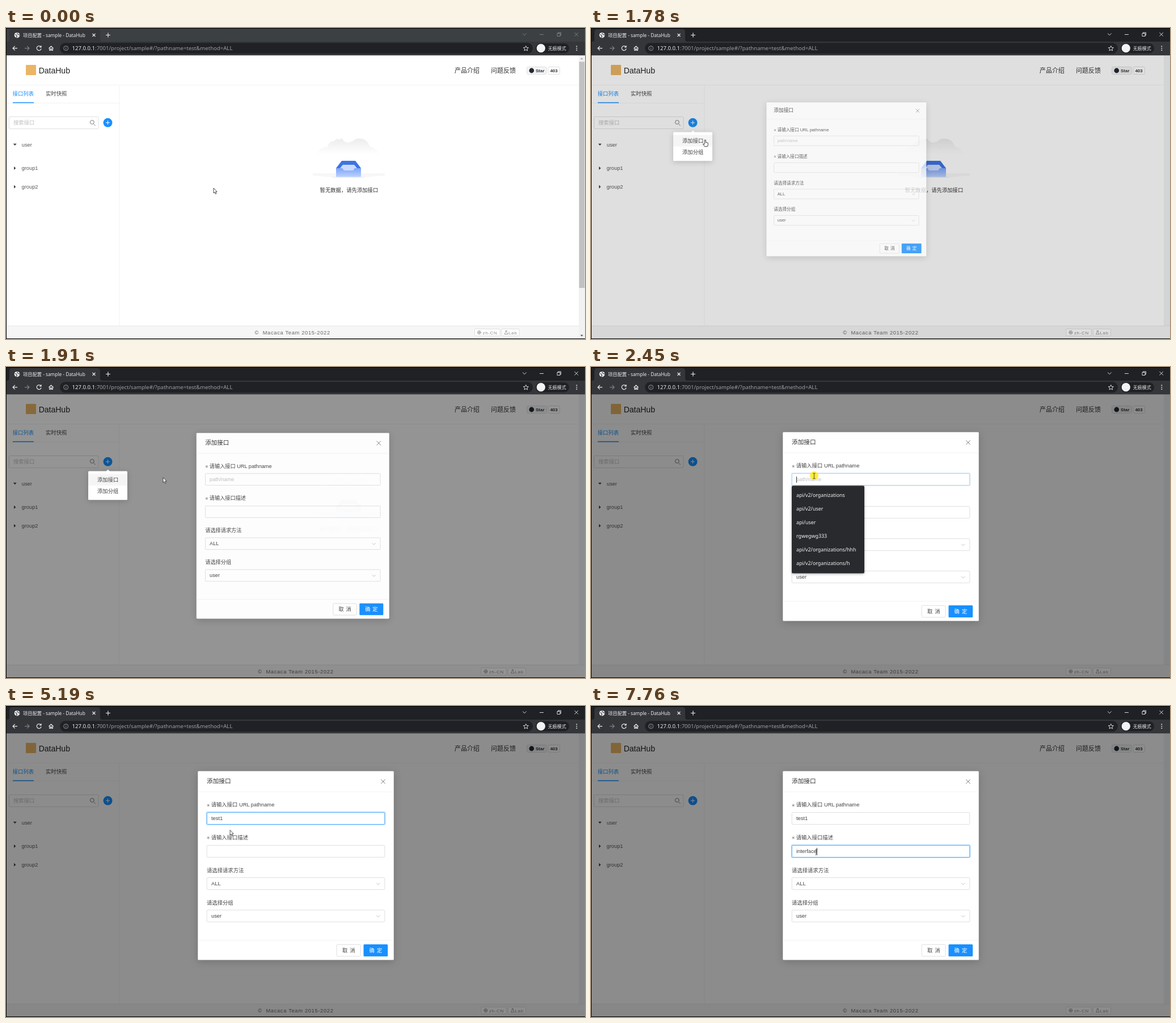
Write an HTML page that moves like this. It is 1021x548 px and loops after 8000 ms.

```html
<!DOCTYPE html>
<html lang="zh-CN">
<head>
<meta charset="utf-8">
<title>DataHub</title>
<style>
html, body { margin: 0; width: 100%; height: 100%; overflow: hidden; background: #fff; }
svg { display: block; width: 1021px; height: 548px; }
text { font: 9.33px "Liberation Sans", "Noto Sans CJK SC", "Noto Sans CJK", sans-serif; fill: #444; white-space: pre; }
.ui text { font-family: "Noto Sans", "Noto Sans CJK SC", "Noto Sans CJK", sans-serif; fill: #e8eaed; }
.ui .tab { font-size: 8.28px; }
.ui .url { font-size: 9.58px; fill: #9aa0a6; }
.ui .mode { font-size: 8px; font-weight: 500; }
.nav text { font-size: 11px; fill: #333; }
.nav .brand { font-size: 14px; fill: #222; }
.nav .star { font-size: 8px; font-weight: bold; }
.tree text { fill: #5a5a5a; }
.hint, text.hint { fill: #bfbfbf; }
.blue, text.blue { fill: #1890ff; }
.foot text { letter-spacing: .667px; fill: #666; }
.foot .tag { font-size: 8px; fill: #8c8c8c; }
.box { fill: #fff; stroke: #d9d9d9; stroke-width: .8; }
.line { fill: none; stroke: #e8eaed; stroke-width: 1.2; }
.rule { stroke: #f0f0f0; stroke-width: .8; }
.ring { fill: none; stroke: #40a9ff; stroke-width: .9; }
.glow { fill: none; stroke: #1890ff; stroke-opacity: .22; stroke-width: 1.6; }
.popup rect { fill: #292a2d; filter: drop-shadow(0 1px 2px rgba(0,0,0,.35)); }
.popup text { font: 8.9px "Noto Sans", sans-serif; fill: #f1f3f4; }
.wide { letter-spacing: 4px; }

.frame { fill: #202124; }
.idle .frame { fill: #3c4043; }
.idle #controls { opacity: .4; }
.locked #scroll { display: none; }
.locked #credit { transform: translateX(5.7px); }
.locked #tags { transform: translateX(11.4px); }

#mask { animation: mask 8s linear infinite; }
#modal { transform-origin: 182px 202px; animation: zoom 8s linear infinite; }
#menu { transform-origin: 180px 181px; animation: menu 8s linear infinite; }
#cursor { animation: path 8s linear infinite; }

@keyframes mask { 0%, 21.56% { opacity: 0; } 24.06%, 100% { opacity: .45; } }
@keyframes zoom {
  0% { opacity: 0; transform: scale(.2); }
  21.56% { opacity: 0; transform: scale(.2); animation-timing-function: cubic-bezier(.08,.82,.17,1); }
  25.31%, 100% { opacity: 1; transform: none; }
}
@keyframes menu {
  0% { opacity: 0; transform: scaleY(.8); }
  7.5% { opacity: 0; transform: scaleY(.8); animation-timing-function: cubic-bezier(.23,1,.32,1); }
  10%, 24.2% { opacity: 1; transform: none; animation-timing-function: cubic-bezier(.755,.05,.855,.06); }
  26.7%, 100% { opacity: 0; transform: scaleY(.8); }
}
@keyframes path {
  0%, .7% { transform: translate(366px,282px); animation-timing-function: cubic-bezier(.4,.1,.4,1); }
  9%, 10.8% { transform: translate(180px,168px); animation-timing-function: ease-in-out; }
  14.5% { transform: translate(179px,219px); animation-timing-function: ease-in-out; }
  18.9%, 21.4% { transform: translate(182px,198px); }
  23.1% { transform: translate(220px,196px); animation-timing-function: cubic-bezier(.2,.5,.4,1); }
  28.8%, 62% { transform: translate(393.5px,192px); animation-timing-function: ease-in-out; }
  68.5%, 100% { transform: translate(397.5px,257.5px); }
}
</style>
</head>
<body>
<svg id="stage" class="idle" viewBox="0 0 1021 548">
  <defs>
    <linearGradient id="cloud" x2="0" y2="1"><stop stop-color="#ececec"/><stop offset="1" stop-color="#fff"/></linearGradient>
    <linearGradient id="tray" x2="0" y2="1"><stop stop-color="#7da5f8"/><stop offset="1" stop-color="#bcd2ff"/></linearGradient>
    <path id="down" class="line" d="M-3-1.5 0 1.7 3-1.5" style="stroke:#bfbfbf;stroke-width:.9"/>
  </defs>
  <rect width="1021" height="548" fill="#fff"/>

  <!-- page -->
  <rect x="1010" y="48" width="11" height="477" fill="#f0f2f5"/>
  <path class="rule" d="M1 100.5H1010M200 101V525M1 132.3H200"/>
  <g class="nav">
    <rect x="35" y="65" width="18" height="18" rx="1" fill="#eab565"/>
    <text class="brand" x="57.7" y="80">DataHub</text>
    <text x="791" y="79">产品介绍</text>
    <text x="855" y="79">问题反馈</text>
    <rect class="box" x="918.6" y="68.5" width="34.5" height="13" rx="2" style="fill:#f3f5f7"/>
    <rect class="box" x="956" y="68.5" width="20.5" height="13" rx="2"/>
    <circle cx="926.8" cy="75" r="4.4" fill="#24292f"/>
    <text class="star" x="934" y="77.8">Star</text>
    <text class="star" x="959.4" y="77.8">403</text>
  </g>
  <text class="blue" x="11.7" y="119.4">接口列表</text>
  <text x="70" y="119.4">实时快照</text>
  <rect class="blue" x="12" y="130.8" width="37" height="1.5"/>
  <rect class="box" x="5.5" y="156.4" width="157.5" height="21.2" rx="1.5"/>
  <text class="hint" x="13" y="170">搜索接口</text>
  <path class="line" d="M155 169.5 157.6 172.2M155.3 166a3.4 3.4 0 1 1-6.8 0a3.4 3.4 0 0 1 6.8 0" style="stroke:#777;stroke-width:1"/>
  <circle class="blue" cx="179.5" cy="166.8" r="8"/>
  <path d="M176 166.8h7M179.5 163.3v7" stroke="#fff"/>
  <g class="tree">
    <path d="M12.7 203.8h6l-3 3.4zM14 244v6l3.4-3zM14 276.8v6l3.4-3z" fill="#444"/>
    <text x="27.7" y="208.6">user</text>
    <text x="27.5" y="250.2">group1</text>
    <text x="27.5" y="283.2">group2</text>
  </g>

  <path d="M547 222Q552 211 567 209Q570 199 579 199Q583 193 588 197Q592 192 595 198Q601 205 612 199Q617 194 626 195Q637 196 642 209Q652 212 660 222Z" fill="url(#cloud)"/>
  <path d="M541 256H668V260Q604 267 541 260Z" fill="#f7f7f7"/>
  <path d="M576 262h55v2h-55z" fill="#f1f1f1"/>
  <path d="M592 234h24l10 13v8h-44v-8z" fill="#3d74e2"/>
  <path d="M594 241h20l5 6v6h-30v-6z" fill="#cbdaff"/>
  <path d="M582 247h10q2 0 2.500 2t2.500 2h14q2 0 2.500-2t2.500-2h10v14q0 1.500-1.500 1.500h-41q-1.500 0-1.500-1.500z" fill="url(#tray)"/>
  <text x="553.6" y="289.4" style="fill:#333">暂无数据，请先添加接口</text>

  <g class="foot">
    <rect y="525" width="1021" height="23" fill="#f6f6f6"/>
    <path d="M0 525H1021" stroke="#e6e6e6"/>
    <g id="credit"><text x="438.500" y="540">©</text><text x="452.700" y="540">Macaca Team 2015-2022</text></g>
    <g id="tags">
      <rect class="box" x="826.5" y="530.3" width="44.5" height="12.2" rx="1.3"/>
      <rect class="box" x="874" y="530.3" width="31" height="12.2" rx="1.3"/>
      <path class="line" d="M831.500 536.500h6M834.500 533.500v6M837.500 536.500a3 3 0 1 1-6 0a3 3 0 0 1 6 0M880.500 533.500h3M881 533.500v2.500l-2 3.500h6l-2-3.500v-2.500" style="stroke:#888;stroke-width:.8"/>
      <text class="tag" x="840.500" y="539.500">zh-CN</text>
      <text class="tag" x="886" y="539.500">Lab</text>
    </g>
  </g>
  <g id="scroll">
    <rect x="1010" y="48" width="11" height="500" fill="#f1f1f1"/>
    <rect x="1010.700" y="59.500" width="9.600" height="398.500" fill="#c1c1c1"/>
    <path d="M1012.800 55.200h5l-2.500-2.700z" fill="#a3a3a3"/>
    <path d="M1012.800 540.700h5l-2.500 2.700z" fill="#505050"/>
  </g>
  <rect id="mask" y="48" width="1021" height="500"/>

  <!-- add menu -->
  <g id="menu">
    <g style="filter:drop-shadow(0 2px 5px rgba(0,0,0,.18))">
      <path d="M176.500 184 179.800 180.700 183 184z" fill="#fff"/>
      <rect x="145" y="183.500" width="69" height="50.700" rx="1.500" fill="#fff"/>
    </g>
    <rect id="hover" x="145" width="69" height="20.300" fill="#f5f5f5"/>
    <text x="161" y="202">添加接口</text>
    <text x="161" y="222">添加分组</text>
  </g>

  <!-- dialog -->
  <g id="modal">
    <rect x="338.300" y="114.800" width="345.500" height="332.700" rx="1.500" fill="#fff" style="filter:drop-shadow(0 3px 7px rgba(0,0,0,.18))"/>
    <path class="rule" d="M338.300 151.300H683.800M338.300 412.800H683.800"/>
    <text x="354" y="136" style="font-size:10.67px;fill:#333">添加接口</text>
    <path class="line" d="m661.300 129.300 7.400 7.600m0-7.600-7.400 7.600" style="stroke:#808080;stroke-width:1"/>
    <path d="M356.700 172.500v5M354.500 173.700l4.400 2.600M358.900 173.700l-4.400 2.600M356.700 229.700v5M354.500 230.900l4.400 2.600M358.900 230.900l-4.400 2.600" stroke="#8a8a8a" stroke-width=".8"/>
    <text x="361.700" y="177.400">请输入接口 URL pathname</text>
    <text x="361.700" y="234.700">请输入接口描述</text>
    <text x="354" y="292.500">请选择请求方法</text>
    <text x="354" y="349.500">请选择分组</text>
    <g id="inputs"></g>
    <text x="362" y="316">ALL</text>
    <text x="362" y="373">user</text>
    <use href="#down" x="656.300" y="313.300"/>
    <use href="#down" x="656.300" y="370.300"/>
    <text id="holder" class="hint" x="362" y="201.300">path/name</text>
    <g id="ring0"><rect class="glow" x="353.300" y="186.500" width="315.500" height="23" rx="2"/><rect class="ring" x="354.300" y="187.500" width="313.500" height="21" rx="1.500"/></g>
    <g id="ring1"><rect class="glow" x="353.300" y="244.500" width="315.500" height="23" rx="2"/><rect class="ring" x="354.300" y="245.500" width="313.500" height="21" rx="1.500"/></g>
    <text id="value0" x="362" y="201.300"></text>
    <text id="value1" x="362" y="258.800"></text>
    <rect id="caret0" y="193" width=".9" height="11" fill="#222"/>
    <rect id="caret1" y="250" width=".9" height="11" fill="#222"/>
    <rect class="box" x="583.200" y="420.300" width="42" height="20.700" rx="1.500"/>
    <rect class="blue" x="630.500" y="419.900" width="42.700" height="21.300" rx="1.500"/>
    <text class="wide" x="593" y="433.500">取消</text>
    <text class="wide" x="640.600" y="433.500" style="fill:#fff">确定</text>
  </g>
  <g id="popup0" class="popup"></g>
  <g id="popup1" class="popup"></g>

  <!-- browser bar -->
  <g class="ui">
    <rect class="frame" width="1021" height="25"/>
    <path d="M2 24q4 0 4-4V7q0-5 5-5h150q5 0 5 5v13q0 4 4 4h851v24.300H0V24z" fill="#35363a"/>
    <rect x="95" y="26.300" width="834" height="18.900" rx="9.400" fill="#202124"/>
    <rect x="934" y="27" width="59" height="17.500" rx="8.700" fill="#202124"/>
    <circle cx="19.500" cy="12.700" r="4.800" fill="#f1f3f4"/>
    <path d="M16 11.500q2 .5 3 2t-1 3M20 8.500q-1 2 1 2.500t2.800 2" class="line" style="stroke:#35363a"/>
    <text class="tab" x="30" y="16">项目配置 - sample - DataHub</text>
    <path class="line" d="m152.500 10 5 5m0-5-5 5M176 12.500h8M180 8.500v8"/>
    <path class="line" d="M20 35.700h-8m3.700-3.700-3.700 3.700 3.700 3.700M61.300 33a4 4 0 1 0 .8 3.500M62 31v3h-3M75.500 36l4-3.800 4 3.800M76.800 35.500v4h1.800v-2.700h1.900v2.700h1.800v-4"/>
    <path class="line" d="M33 35.700h8m-3.700-3.700 3.700 3.700-3.700 3.700" style="stroke:#7d8085"/>
    <path class="line" d="M109.700 35.700a4 4 0 1 1-8 0a4 4 0 0 1 8 0M105.700 35.200v2.600M105.700 33.300v1" style="stroke:#9aa0a6;stroke-width:.9"/>
    <text class="url" x="116.500" y="39.200"><tspan fill="#e8eaed">127.0.0.1</tspan>:7001/project/sample#/?pathname=test&amp;method=ALL</text>
    <path class="line" d="m916.800 31.500 1.300 2.900 3.200.3-2.400 2.100.7 3.200-2.800-1.700-2.800 1.700.7-3.200-2.400-2.100 3.200-.3z" style="stroke-width:.9"/>
    <circle cx="943.300" cy="35.700" r="7.600" fill="#f1f3f4"/>
    <text class="mode" x="955.800" y="38.800">无痕模式</text>
    <path d="M1005.500 31.500h1.700v1.700h-1.700zM1005.500 34.900h1.700v1.700h-1.700zM1005.500 38.300h1.700v1.700h-1.700z" fill="#e8eaed"/>
    <path id="controls" class="line" d="m911 9.500 3.300 3.200 3.300-3.200M941 11.500h7M972 9.500h5v5h-5zM973.500 9.500v-1.500h5v5h-1.500M1002.500 8l6.500 6.500m0-6.500-6.500 6.500" style="stroke-width:.9"/>
  </g>
  <path d="M.5 0V548M0 547.500H1021M0 .5H1021" stroke="#000"/>

  <g id="cursor">
    <circle id="click" cy="-.5" r="7.500" fill="#ffe921" fill-opacity=".85"/>
    <path id="arrow" d="M0 0v9l2-1.800 1.500 3.200 1.500-.7-1.500-3.100H6.200z" fill="#fff" stroke="#222" stroke-width=".8"/>
    <path id="hand" d="M0 0q1 0 1 1v3.500q3 0 4 1.300.6 3-1 6H-1q-1-2-3-4 0-1 2.200 0H-1V1q0-1 1-1z" fill="#fff" stroke="#222" stroke-width=".9"/>
    <path id="beam" d="M-2-4.700h1.500l.5.500.5-.5H2M0-4V4M-2 4.700h1.500l.5-.5.5.5H2" fill="none" stroke="#222" stroke-width=".9"/>
  </g>
</svg>
<script>
const $ = id => document.getElementById(id);
const show = (id, on) => $(id).style.display = on ? '' : 'none';
const within = (t, a, b) => t >= a && t < b;
const LOOP = 8000, BLINK = 530, LEFT = 362;

// keys: [time, letters shown]; typing restarts the caret blink
const fields = [
  { word: 'test1', blur: 5510, top: 209.3, keys: [[2450, 0], [3400, 1], [3470, 2], [3610, 3], [3870, 4], [4400, 5]],
    tips: ['api/v2/organizations', 'api/v2/user', 'api/user', 'rgwegwg333', 'api/v2/organizations/hhh', 'api/v2/organizations/h'] },
  { word: 'interface', blur: LOOP, top: 266.5, keys: [[5510, 0], [6240, 1], [6440, 2], [6710, 3], [6970, 5], [7370, 6], [7500, 7], [7630, 8], [7760, 9]],
    tips: ['...', 'test', 'create user', 'get user info', 'datahub sample', 'snapre-firewall'] }
];

$('inputs').innerHTML = [187.5, 245.5, 302.5, 359.5]
  .map(y => `<rect class="box" x="354.300" y="${y}" width="313.500" height="21" rx="1.500"/>`).join('');
fields.forEach((f, i) => {
  $('popup' + i).innerHTML = `<rect x="354" y="${f.top}" width="128" height="154.300" rx="2"/>` +
    f.tips.map((s, k) => `<text x="${LEFT}" y="${f.top + 20 + k * 23.9}">${s}</text>`).join('');
});

function drawField(f, i, t) {
  const key = f.keys.filter(k => k[0] <= t).pop();
  const focus = key && t < f.blur;
  const value = $('value' + i), start = f.keys[0][0];
  value.textContent = key ? f.word.slice(0, key[1]) : '';
  show('popup' + i, within(t, start, f.keys[1][0]));
  show('caret' + i, focus && (t - key[0]) % (2 * BLINK) < BLINK);
  if (focus) $('caret' + i).setAttribute('x', LEFT + (key[1] ? value.getComputedTextLength() : 0));
  $('ring' + i).style.opacity = focus ? Math.min(1, (t - start + 120) / 320) : 0;
}

function draw(t) {
  $('stage').classList.toggle('idle', t < 70);
  $('stage').classList.toggle('locked', t >= 1710);
  fields.forEach((f, i) => drawField(f, i, t));
  show('holder', t < 3400);

  show('hover', t > 960);
  $('hover').setAttribute('y', within(t, 1080, 1340) ? 208.6 : 188.4);

  const hand = within(t, 530, 1830);
  const beam = within(t, 2060, 5130) || t >= 5290;
  show('hand', hand);
  show('beam', beam);
  show('arrow', !hand && !beam);
  show('click', within(t, 2440, 2655) || within(t, 5500, 5695));
}

let start;
function tick(now) {
  start ??= now;
  draw((now - start) % LOOP);
  requestAnimationFrame(tick);
}
draw(0);
requestAnimationFrame(tick);
</script>
</body>
</html>
```
